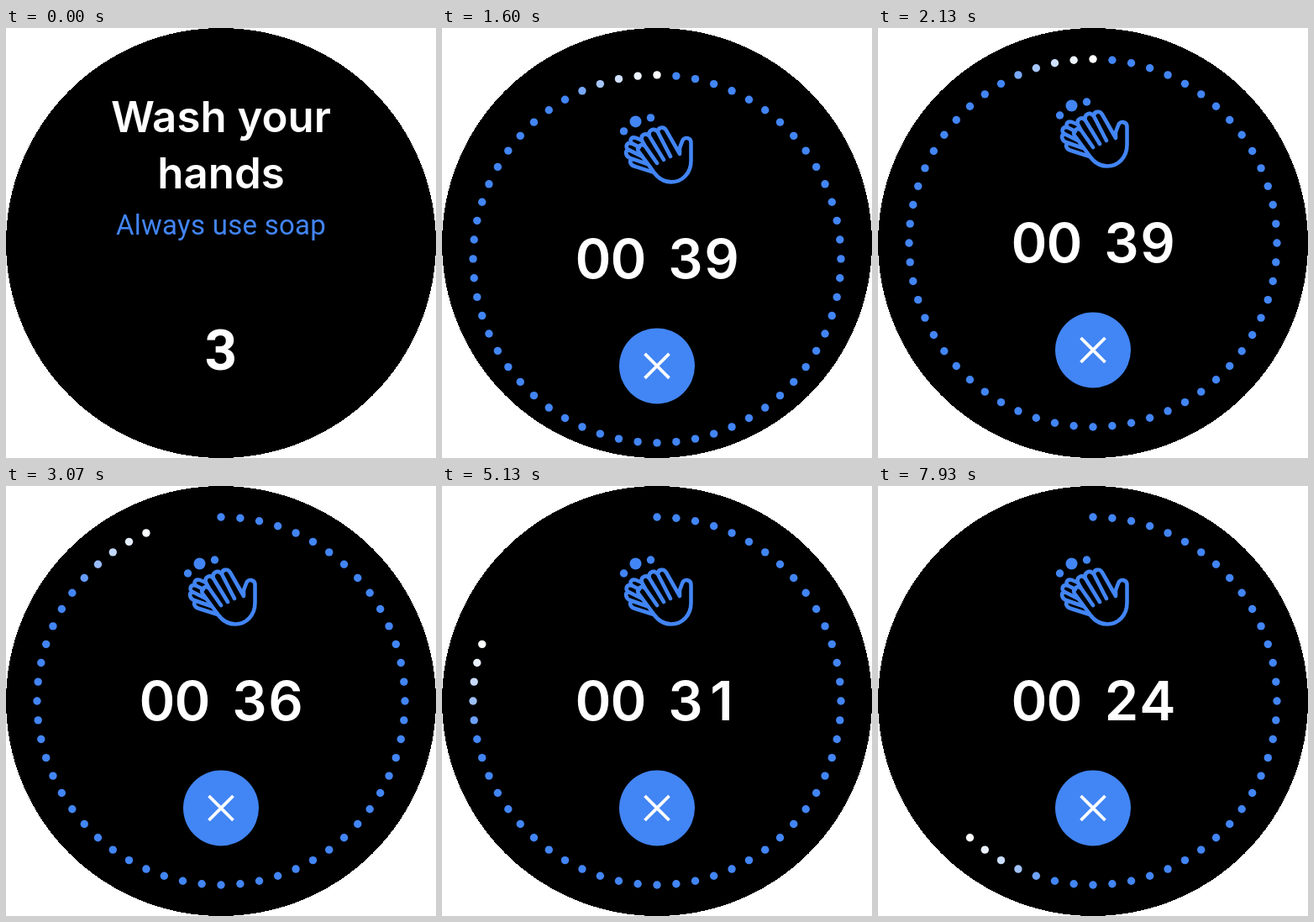
An HTML page for the animation above (8000 ms loop, 512 px wide and 512 px high).

```html
<!DOCTYPE html>
<html lang="en">
<head>
<meta charset="utf-8">
<title>Hand wash timer</title>
<style>
  html, body { margin: 0; width: 100%; height: 100%; overflow: hidden; background: #fff; }
  svg { display: block; width: 100vw; height: 100vh; }
  text { fill: #fff; text-anchor: middle; font-family: Inter, sans-serif; }
  .title { font-size: 51px; font-weight: 600; }
  .hint { font: 33px Roboto, sans-serif; letter-spacing: .26px; fill: #4285f4; }
  .count { font: 700 67px Roboto, sans-serif; }
  .clock { font-size: 65px; font-weight: 600; }
  .blue { fill: #4285f4; }
  .line { fill: none; stroke: #4285f4; stroke-width: 4.6; stroke-linecap: round; stroke-linejoin: round; }
</style>
</head>
<body>
<svg viewBox="0 0 512 512">
  <circle cx="256" cy="256" r="256" shape-rendering="crispEdges"/>
  <g id="intro">
    <text class="title" x="256" y="124">Wash your</text>
    <text class="title" x="256" y="191">hands</text>
    <text class="hint" x="256" y="246">Always use soap</text>
    <text class="count" id="count" x="256" y="407">3</text>
  </g>
  <g id="timer">
    <g id="ring"></g>
    <g class="blue">
      <circle cx="216.5" cy="104" r="4.7"/>
      <circle cx="230.5" cy="92.5" r="7"/>
      <circle cx="248.5" cy="88" r="4.7"/>
      <circle cx="256" cy="383.5" r="45"/>
    </g>
    <g class="line">
      <!-- front hand -->
      <path d="M283 124L286 116C288 110 296.500 111 296.500 118V139C296.500 154 286 164.500 273 164.500C263 164.500 256 159 251 151L234 128C231 122 238 118 242 122L256 142M242 122L238 115C236 108 243 105 247 110L264 138M247 110C245 103 252 99 257 105L272 134M257 105C257 99 264 98 267 103L279 124L283 131V124"/>
      <!-- back hand -->
      <path d="M238 115L231 112C225 110 222 116 227 119L235 123M227 119C220 116 217 123 222 126L238 134M222 126C217 128 219 134 224 136L244 143M226 137C222 140 225 145 230 146L252 153"/>
    </g>
    <path d="M241.500 369L270.500 398M270.500 369L241.500 398" stroke="#fff" stroke-width="3.8"/>
    <text class="clock" id="clock" x="180 222 256 290 333" y="279">00 39</text>
  </g>
</svg>
<script>
const LOOP = 8000, DOTS = 60, FADE_AT = 1250;
const $ = id => document.getElementById(id);
const clamp = v => Math.min(1, Math.max(0, v));

const dots = Array.from({ length: DOTS }, (_, i) => {
  const dot = document.createElementNS('http://www.w3.org/2000/svg', 'circle');
  const a = i / DOTS * 2 * Math.PI;
  dot.setAttribute('cx', 256 - 219 * Math.sin(a));
  dot.setAttribute('cy', 256 - 219 * Math.cos(a));
  dot.setAttribute('r', 4.7);
  return $('ring').appendChild(dot);
});

function setText(id, s) {
  if ($(id).textContent !== s) $(id).textContent = s;
}

function draw(t) {
  const fade = clamp((t - FADE_AT) / 330);
  const p = clamp((t - FADE_AT) / 850);
  $('intro').style.opacity = 1 - fade;
  $('timer').style.opacity = fade ** 1.5;
  $('timer').setAttribute('transform', `translate(0 ${30 * (1 - p * p * (3 - 2 * p))})`);

  setText('count', t < 865 ? '3' : t < 1265 ? '2' : '1');
  const elapsed = Math.max(0, Math.floor((t - 2220) / 385) + 1);
  setText('clock', '00 ' + (39 - elapsed));

  // White head sweeps counter-clockwise, erasing dots; the top dot stays
  const head = Math.max(0, (t - 2146) / 253);
  dots.forEach((dot, i) => {
    const gone = i < head;
    const w = gone ? 0 : 1 - clamp((i - head) / 5) ** 1.5;
    const mix = c => Math.round(c + (255 - c) * w);
    dot.setAttribute('fill', `rgb(${mix(66)},${mix(133)},${mix(244)})`);
    dot.setAttribute('visibility', gone && i ? 'hidden' : 'inherit');
  });
}

const start = performance.now();
function tick() {
  draw((performance.now() - start) % LOOP);
  requestAnimationFrame(tick);
}
tick();
</script>
</body>
</html>
```
